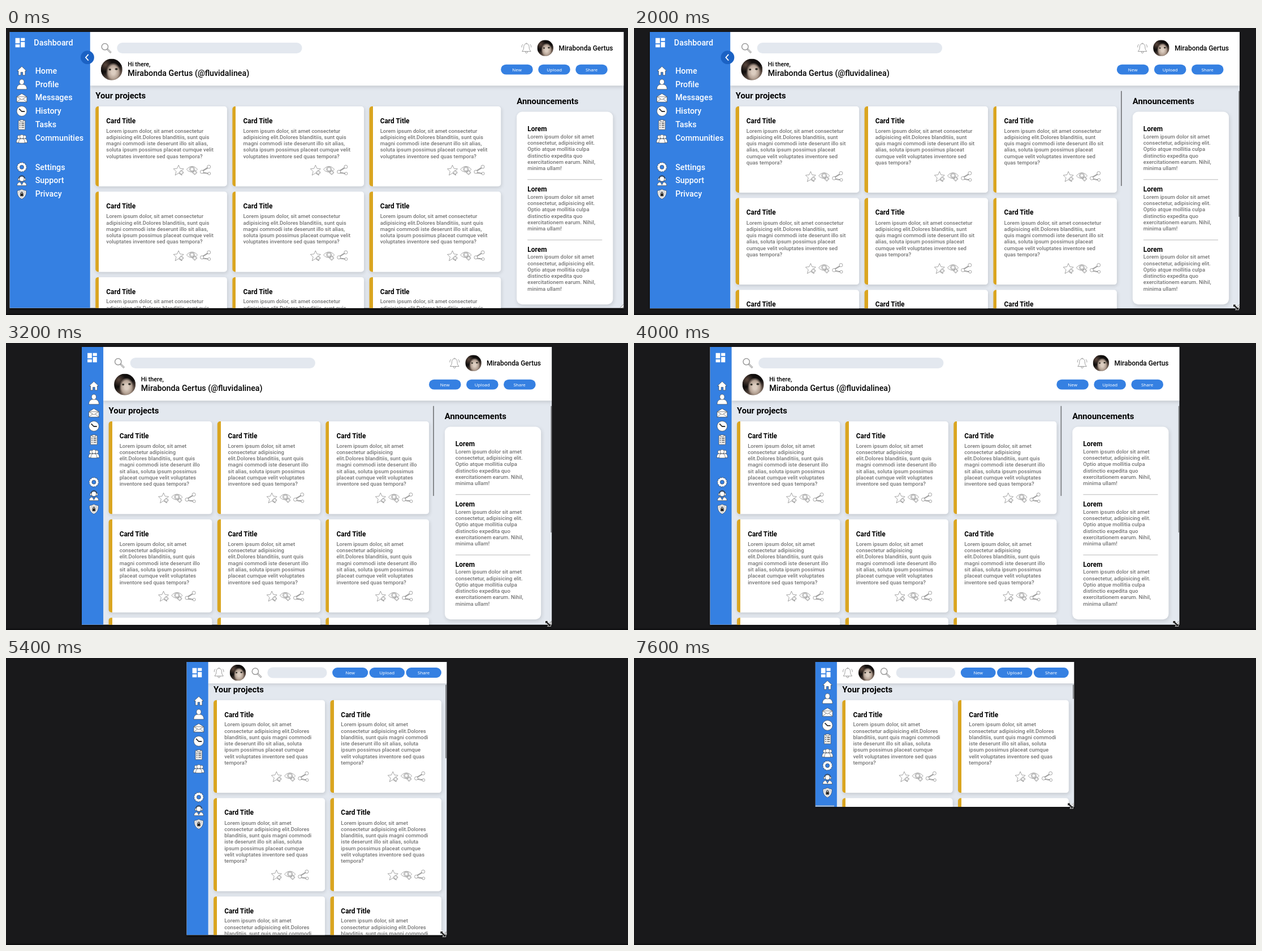
An HTML page for the animation above (8000 ms loop, 1100 by 509 pixels).

```html
<!DOCTYPE html>
<html lang="en">
<head>
<meta charset="utf-8">
<title>Responsive dashboard</title>
<style>
*{box-sizing:border-box;margin:0;padding:0}
html,body{width:100%;height:100%;overflow:hidden;background:#19191b}
body{position:relative;background:linear-gradient(#0000 calc(100% - 4px),#0c0c0e) #19191b}
ul{list-style:none}
svg{display:block;width:32px;height:32px;flex:none;overflow:visible}

.win{position:absolute;top:7px;left:0;transform-origin:0 0;container-type:size;overflow:hidden;
  background:#e3e8ef;box-shadow:0 2px 5px #000;font:500 16px/19px Roboto,sans-serif;color:#000}
.app{display:grid;grid-template:160px minmax(0,1fr)/239px minmax(0,1fr);height:100%}

.side{grid-row:1/3;position:relative;z-index:2;background:#3580e2;color:#fff;font-size:24px;line-height:40px}
.brand{position:absolute;top:12px;left:15px;display:flex;gap:25px}
.brand svg{margin-top:4px}
.side ul:first-of-type{padding-top:96px}
.side ul+ul{padding-top:47px}
.side li{display:flex;align-items:center;gap:24px;height:40px;padding-left:20px}
.side li:nth-child(6) svg{position:relative;top:3px}
.fold{position:absolute;left:211px;top:56px;width:40px;height:40px;border-radius:50%;background:#1b62c4}
.fold svg{margin:4px}
.hbar{display:none;position:absolute;left:0;bottom:1px;width:56px;height:3px;background:#c3c5c8}

header{position:relative;z-index:1;padding:24px 32px 16px;background:#fff;box-shadow:0 4px 10px #0002}
.row,.search,.user,.greet,.actions{display:flex;align-items:center;gap:16px}
.top{height:48px;gap:80px}
.sub{height:64px;margin-top:8px}
.search{flex:0 1 598px;min-width:0}
.bar{flex:1;height:32px;border-radius:16px;background:#e3e8ef}
.user{margin-left:auto;font-size:20px;white-space:nowrap}
.greet{white-space:nowrap}
.greet p{font-size:18px;line-height:22px}
.greet p+p{font-size:24px;line-height:30px}
.actions{margin:0 16px 0 auto}
.actions b{width:95px;height:30px;border-radius:15px;background:#3580e2;color:#fff;text-align:center;
  font:400 13.33px/30px "Noto Sans","DejaVu Sans",sans-serif}
.photo{flex:none;width:48px;height:48px;border-radius:50%;background:
  radial-gradient(ellipse at 42% 50%,#2c2a22 0 4%,#0000 8%),
  radial-gradient(ellipse at 72% 48%,#2c2a22 0 4%,#0000 8%),
  radial-gradient(ellipse 34% 44% at 58% 62%,#dccdc0 25%,#b3a092 70%,#0000),
  radial-gradient(circle at 22% 28%,#5a463c,#0000 30%),
  linear-gradient(155deg,#110e0d 48%,#5a4a41 72%,#8b7a6d)}
.greet .photo{width:64px;height:64px}

main{display:grid;grid-template-columns:minmax(0,1fr) 349px;min-height:0;position:relative}
h2{font-size:25px;line-height:30px;margin-bottom:16px}
h3{font-size:20px;line-height:23.4px}
.projects{position:relative;overflow:hidden;padding:16px 16px 0;min-height:0}
.grid{display:grid;grid-template-columns:repeat(auto-fit,minmax(300px,1fr));gap:16px}
.card{padding:32px;border-radius:8px;background:linear-gradient(90deg,#daa520 10px,#fff 10px);
  box-shadow:2px 4px 10px #0002}
.card p,.panel p{color:#757575}
.card p{margin:8px -3px 16px 0}
.tools{display:flex;justify-content:flex-end;gap:8px;padding-right:16px}
aside{padding:32px 32px 0 31px;min-height:0;overflow:hidden}
.panel{height:574px;padding:24px 32px 0;border-radius:16px;background:#fff;box-shadow:2px 4px 12px #0002}
.panel li{padding:16px 0 23px}
.panel p{margin-top:1px}
.panel li+li{border-top:2px solid #c4c4c4}
.thumb{position:absolute;top:16px;right:1px;width:3px;background:#7b7d80}
#pageThumb{right:0;height:56.5%}
.grip{position:absolute;right:0;bottom:0;width:12px;height:12px;z-index:3;
  clip-path:polygon(100% 0,100% 100%,0 100%);background:repeating-linear-gradient(135deg,#eee 0 2px,#777 2px 3px)}
#cursor{position:absolute;left:0;top:0;width:11px;height:11px}

@container (max-width:1400px){
  .app{grid-template-columns:64px minmax(0,1fr)}
  .side span,.fold{display:none}
}
@container (max-width:900px){
  .app{grid-template-rows:64px minmax(0,1fr)}
  header{display:flex;align-items:center;gap:16px;padding:0 16px}
  .row{display:contents}
  .user{margin:0}
  .name,.greet,aside,#pageThumb{display:none}
  .search{order:1;flex:225 1 0}
  .actions{order:2;flex:323 1 0;gap:4px;margin:0}
  .actions b{flex:1;width:auto}
  main{grid-template-columns:minmax(0,1fr)}
  .projects{padding-top:4px}
  .thumb{top:4px}
}
@container (max-height:500px){
  .side ul:first-of-type{padding-top:49px}
  .side ul+ul{padding-top:0}
  .hbar{display:block}
}
</style>
</head>
<body>
<svg style="display:none">
  <defs>
    <g id="dash" fill="#fff"><path d="M2 2h13v16H2zM18 2h12v9H18zM2 21h13v9H2zM18 14h12v16H18z"/></g>
    <g id="fold" fill="none" stroke="#fff" stroke-width="3"><path d="M19 7l-8 9 8 9"/></g>
    <g id="search" fill="none" stroke="#999"><circle cx="12" cy="12" r="9.500" stroke-width="2.500"/>
      <path d="M19 19l11 11" stroke-width="5"/><path d="M20 20l9.500 9.500" stroke="#ddd" stroke-width="2.500"/></g>
    <g id="bell" fill="#fff" stroke="#777" stroke-width="1.200"><circle cx="16" cy="28" r="3"/>
      <path d="M16 3c-6 0-8 5-8 10 0 7-2 9-5 13h26c-3-4-5-6-5-13 0-5-2-10-8-10zM5 5q-4 4-3 9M27 5q4 4 3 9M14 3q2-4 4 0"/></g>
    <g id="plus"><path d="M22 17h4v4h4v4h-4v4h-4v-4h-4v-4h4z"/></g>
    <g id="Home"><path d="M16 3l14 13h-4v13h-7v-9h-6v9H6V16H2z"/></g>
    <g id="Profile"><path d="M1 31c0-10 5-15 15-15s15 5 15 15z"/><ellipse cx="16" cy="9" rx="7" ry="8"/></g>
    <g id="Messages"><path d="M1 13L16 4l15 9v16H1z"/><path d="M1 13h30L16 22zM1 29l11-9M31 29l-11-9"/></g>
    <g id="History"><circle cx="16" cy="16" r="15"/><path d="M8 9l8 8h9" fill="none" stroke-width="3"/></g>
    <g id="Tasks"><path d="M6 4h20v27H6z" fill="#eee"/><path d="M11 2h10v5H11z"/>
      <path d="M9 12h3M15 12h8M9 18h3M15 18h8M9 24h3M15 24h8" stroke-width="2"/></g>
    <g id="Communities"><path d="M0 27c0-8 2-12 8-12s8 4 8 12zM16 27c0-8 2-12 8-12s8 4 8 12z"/>
      <circle cx="8" cy="10" r="5"/><circle cx="24" cy="10" r="5"/>
      <path d="M7 28c0-9 3-13 9-13s9 4 9 13z"/><circle cx="16" cy="9" r="6"/></g>
    <g id="Settings"><circle cx="16" cy="16" r="12.500" stroke-width="5" stroke-dasharray="3.900 2.640"/>
      <circle cx="16" cy="16" r="12" stroke="#fff" stroke-width="4" stroke-dasharray="3.400 2.880"/>
      <circle cx="16" cy="16" r="10.500" stroke="#fff"/><circle cx="16" cy="16" r="6" fill="#3580e2"/></g>
    <g id="Support"><path d="M2 31c0-8 5-11 14-11s14 3 14 11zM11 20l5 9 5-9"/><circle cx="16" cy="11" r="7.500"/>
      <path d="M7 12C7-2 25-2 25 12" fill="none" stroke-width="2"/><path d="M5 9h4v7H5zM23 9h4v7h-4z"/></g>
    <g id="Privacy"><path d="M16 2q6 4 13 4c1 13-4 20-13 25C7 26 2 19 3 6q7 0 13-4z"/>
      <path d="M16 6q4 3 9 3c0 9-3 14-9 18-6-4-9-9-9-18q5 0 9-3z" fill="#eee" stroke="#888"/>
      <path d="M12 15h8v7h-8z" fill="#222"/><path d="M13 15c-1-6 7-6 6 0" fill="none" stroke-width="2"/></g>
    <g id="star"><path d="M16 1l4.500 10L31 12l-8 8 3 11-10-6-10 6 3-11-8-8 10.500-1z"/><use href="#plus"/></g>
    <g id="eye"><path d="M0 14C8 2 24 2 32 14 24 24 8 24 0 14z"/><circle cx="16" cy="13" r="7.500"/>
      <circle cx="16" cy="13" r="5"/><use href="#plus"/></g>
    <g id="share"><path d="M6 19L24 8M6 23l20 3" stroke-width="3"/><path d="M6 19L24 8M6 23l20 3" stroke="#fff"/>
      <circle cx="5.500" cy="21" r="5"/><circle cx="26" cy="6" r="5"/><circle cx="27" cy="26" r="4"/></g>
  </defs>
</svg>

<div class="win" id="win"><div class="app">
  <nav class="side">
    <div class="brand"><svg><use href="#dash"/></svg><span>Dashboard</span></div>
    <ul id="places"></ul><ul id="options"></ul>
    <div class="fold"><svg><use href="#fold"/></svg></div>
    <div class="hbar"></div>
  </nav>
  <header>
    <div class="row top">
      <div class="search"><svg><use href="#search"/></svg><div class="bar"></div></div>
      <div class="user"><svg><use href="#bell"/></svg><div class="photo"></div><span class="name">Mirabonda Gertus</span></div>
    </div>
    <div class="row sub">
      <div class="greet"><div class="photo"></div><div><p>Hi there,</p><p>Mirabonda Gertus (@fluvidalinea)</p></div></div>
      <div class="actions"><b>New</b><b>Upload</b><b>Share</b></div>
    </div>
  </header>
  <main>
    <section class="projects" id="projects">
      <h2>Your projects</h2><div class="grid" id="grid"></div><div class="thumb" id="thumb"></div>
    </section>
    <aside><h2>Announcements</h2><ul class="panel" id="news"></ul></aside>
    <div class="thumb" id="pageThumb"></div>
  </main>
</div><div class="grip"></div></div>

<svg id="cursor" viewBox="0 0 12 12"><path d="M1 1h5L4.500 2.500l5 5L11 6v5H6l1.500-1.500-5-5L1 6z" fill="#222" stroke="#fff" stroke-width="1.400" paint-order="stroke"/></svg>

<script>
const $ = id => document.getElementById(id);
const icon = (id, stroke) => `<svg fill="#fff" stroke="${stroke}"><use href="#${id}"/></svg>`;
const navItems = names => names.map(n => `<li>${icon(n, '#333')}<span>${n}</span></li>`).join('');

$('places').innerHTML = navItems(['Home', 'Profile', 'Messages', 'History', 'Tasks', 'Communities']);
$('options').innerHTML = navItems(['Settings', 'Support', 'Privacy']);
$('grid').innerHTML = `<article class="card"><h3>Card Title</h3>
  <p>Lorem ipsum dolor, sit amet consectetur adipisicing elit.Dolores blanditiis, sunt quis magni commodi iste
  deserunt illo sit alias, soluta ipsum possimus placeat cumque velit voluptates inventore sed quas tempora?</p>
  <div class="tools">${['star', 'eye', 'share'].map(n => icon(n, '#666')).join('')}</div></article>`.repeat(15);
$('news').innerHTML = `<li><h3>Lorem</h3><p>Lorem ipsum dolor sit amet consectetur, adipisicing elit.
  Optio atque mollitia culpa distinctio expedita quo exercitationem earum. Nihil, minima ullam!</p></li>`.repeat(3);

const LOOP = 8000, STEP = 200, SCALE = 0.595, CENTER = 549.5, TOP = 7;

// time, window width, window bottom (stage pixels)
const keys = [
  [0, 1086, 496.5], [1200, 1086, 496.5], [1400, 1083, 497], [1800, 1068, 497], [2200, 1018, 497],
  [2400, 972, 497], [2600, 915, 497.5], [2800, 870, 498.5], [3000, 845, 499], [3200, 831, 499.5],
  [3400, 831, 499.5], [3600, 830.5, 499.5], [3800, 830.5, 499.5], [4000, 830, 499.5], [4200, 815, 499.5],
  [4400, 770, 499], [4800, 627, 498.5], [5000, 558, 496.5], [5200, 500, 494], [5400, 460, 491.5],
  [5800, 459.5, 470], [6200, 459, 423], [6600, 458.5, 360], [7000, 458, 312], [7400, 457.5, 272],
  [7600, 457.5, 264], [8000, 457.5, 264]
];

function sizeAt(t) {
  const i = keys.findIndex(k => k[0] > t);
  const [a, b] = [keys[i - 1], keys[i]];
  const f = (t - a[0]) / (b[0] - a[0]);
  return [1, 2].map(n => a[n] + (b[n] - a[n]) * f);
}

function draw(now) {
  const t = Math.floor(now % LOOP / STEP) * STEP;
  const [width, bottom] = sizeAt(t);
  const left = CENTER - width / 2;
  const win = $('win').style;
  win.width = width / SCALE + 'px';
  win.height = (bottom - TOP) / SCALE + 'px';
  win.transform = `translateX(${left}px) scale(${SCALE})`;

  const pad = $('thumb').offsetTop;
  const view = $('projects').clientHeight - pad;
  const content = $('grid').offsetHeight + 62;
  $('thumb').style.height = view * view / content - 14 + 'px';
  $('thumb').style.visibility = t < 1400 ? 'hidden' : 'visible';
  $('pageThumb').style.visibility = t < 1600 ? 'hidden' : 'visible';

  const away = Math.max(0, (800 - t) / 600);
  $('cursor').style.visibility = t < 200 ? 'hidden' : 'visible';
  $('cursor').style.transform = `translate(${left + width - 12 + away * 9}px,${bottom - 7.5 + away * 12}px)`;
  requestAnimationFrame(draw);
}
draw(performance.now());
</script>
</body>
</html>
```
